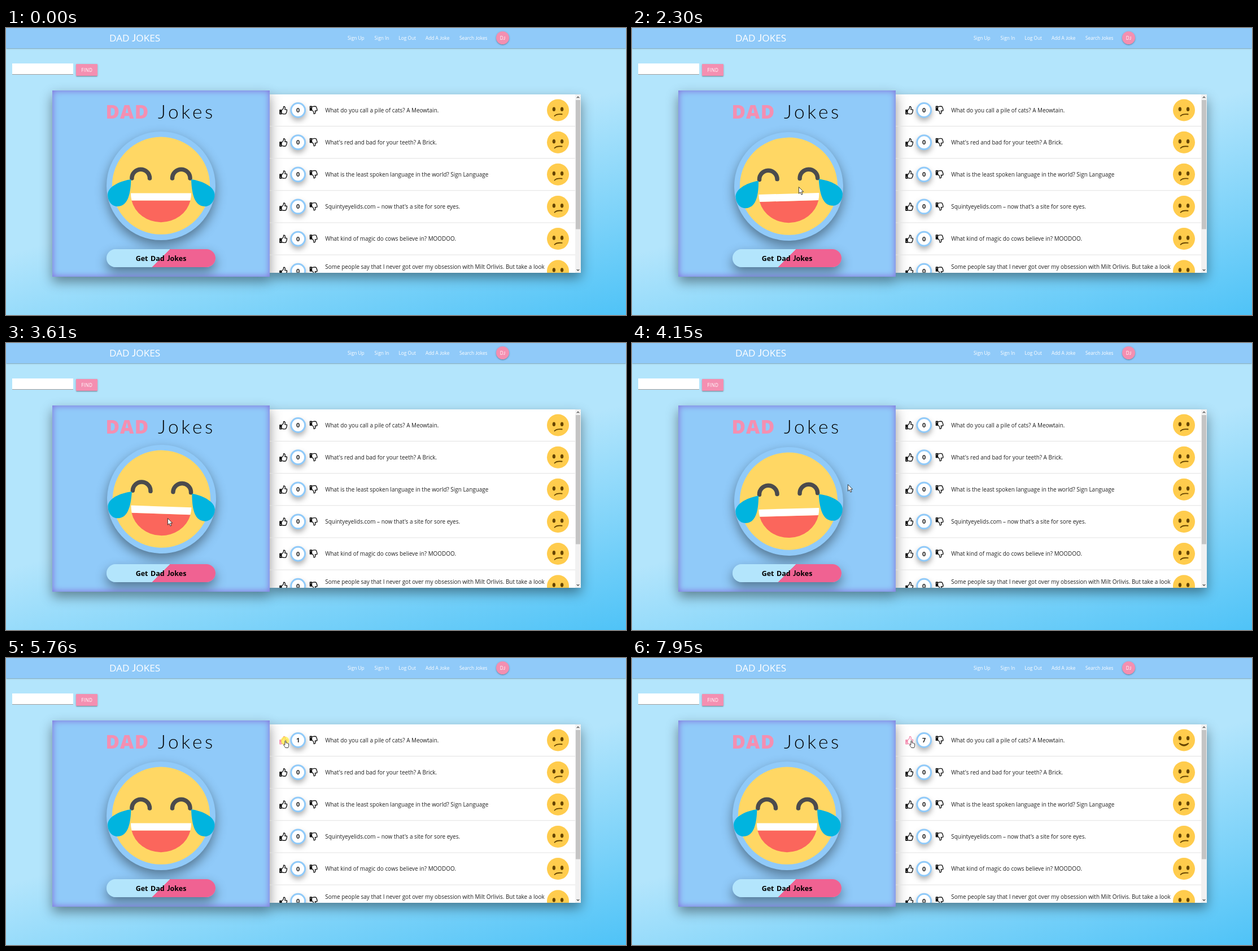
These frames come from a looping animation (1098 by 510 pixels, 8000 ms). An HTML page:

```html
<!DOCTYPE html>
<html lang="en">
<head>
<meta charset="utf-8">
<title>Dad Jokes</title>
<style>
  html, body { margin: 0; width: 100%; height: 100%; overflow: hidden; }
  body {
    position: relative;
    background: linear-gradient(165deg, #b3e5fc 50%, #4fc3f7);
    --lift: 0 9px 20px rgba(0, 0, 0, .42);
    --raise: 0 1.4px 1.4px rgba(0, 0, 0, .14), 0 2px .7px -1.4px rgba(0, 0, 0, .12), 0 .7px 3.5px rgba(0, 0, 0, .2);
  }
  div, svg { position: absolute; }
  .bar { left: 0; top: 0; width: 1098px; height: 36px; background: #90caf9; box-shadow: var(--raise); }
  .avatar { left: 868px; top: 6px; width: 23px; height: 23px; border-radius: 50%;
    background: #f48fb1; box-shadow: var(--raise); }
  .field { left: 11px; top: 63px; width: 108px; height: 19px; background: #fff;
    border-bottom: 1px solid #9e9e9e; }
  .find { left: 124px; top: 64px; width: 38px; height: 20.5px; border-radius: 1px;
    background: #f48fb1; box-shadow: var(--raise); }
  .card { left: 82px; top: 111px; width: 385px; height: 331px; }
  .list { left: 467px; top: 118px; width: 551px; height: 317px; background: #fff; }
  .lift { box-shadow: var(--lift); }
  .side { overflow: hidden; background: #90caf9; box-shadow: inset 0 0 11px 1px #8474dc; }
  .face { left: 96px; top: 72.5px; width: 193px; height: 193px; border-radius: 50%;
    background: #90caf9; box-shadow: var(--lift); }
  .get { left: 96px; top: 282px; width: 193px; height: 32px; border-radius: 16px;
    background: linear-gradient(135deg, #b3e5fc 50%, #f06292 50%); box-shadow: var(--lift); }
  .stage { left: 0; top: 0; }
  text { font-family: "Open Sans", "Noto Sans", sans-serif; white-space: pre; }
  .j { font-family: Lato, sans-serif; }
  .brand { font-size: 17.2px; fill: #fff; }
  .nav { font-size: 8.3px; fill: #fff; }
  .label { font-size: 8.1px; letter-spacing: .35px; fill: #fff; }
  .dad { font-size: 33.5px; font-weight: 800; letter-spacing: 1.5px; fill: #f48fb1; }
  .jokes { font-family: Lato, sans-serif; font-size: 33.5px; font-weight: 300; letter-spacing: 4.7px; }
  .cta { font-size: 12.5px; font-weight: 700; word-spacing: 1.2px; }
  .joke { font-size: 9.95px; fill: #212121; }
  .votes { font-size: 11px; font-weight: 700; fill: #212121; text-anchor: middle; }
  .ring { fill: #fff; stroke: #90caf9; stroke-width: 3; filter: drop-shadow(0 5px 5px rgba(0, 0, 0, .3)); }
  .thumb { fill: none; stroke: currentColor; stroke-width: 1.35; stroke-linejoin: round; color: #111; }
  .mouth { fill: none; stroke: #664500; stroke-width: 1.9; stroke-linecap: round; stroke-linejoin: round; }
</style>
</head>
<body>
<div class="bar"></div>
<div class="avatar"></div>
<div class="field"></div>
<div class="find"></div>
<div class="list lift"></div>
<div class="card lift"></div>
<div class="card side">
  <div class="face" id="face">
    <svg width="193" height="193" viewBox="178 183.5 193 193" overflow="visible">
      <circle cx="274.5" cy="279.7" r="86.6" fill="#ffd764"/>
      <g fill="none" stroke="#4b4b4d" stroke-width="7.5" stroke-linecap="round">
        <path d="M222.9 266.5a15.8 15.8 0 0 1 31.6 0"/>
        <path d="M294.5 266.5a15.8 15.8 0 0 1 31.6 0"/>
      </g>
      <path id="tear" fill="#00b4df" d="M221.5 268.5C205 270.5 181 280 180 295C180 307 187 316.5 197 316.5C214 316.5 220.5 299 221.5 268.5Z"/>
      <use href="#tear" transform="matrix(-1 0 0 1 549.5 0)"/>
      <path fill="#fb665c" d="M222.4 306H326.6A53.5 50 0 0 1 222.4 306Z"/>
      <path fill="#fff" d="M221 293H328Q328 300 326.4 306H222.6Q221 300 221 293Z"/>
    </svg>
  </div>
  <div class="get"></div>
</div>

<svg class="stage" width="1098" height="510" viewBox="0 0 1098 510">
  <defs>
    <clipPath id="view"><rect x="467" y="118" width="541" height="317"/></clipPath>
    <g id="hand-icon">
      <path d="M4.4 7.4C6.4 6.3 7.6 4.2 7.7 1C9.6.6 10.9 2.2 10.2 4.8L9.8 6.2H12.6C13.6 6.3 13.9 7.4 13.2 8.1C13.7 8.9 13.5 9.7 12.8 10.3C13.1 11.2 12.7 12 12 12.4C12.1 13.5 11.4 14.2 10.2 14.2H8C6.4 14.2 5.6 13.4 4.4 13.3"/>
      <path fill="currentColor" d="M.9 7H4V14.2H.9Z"/>
      <circle cx="2.4" cy="12.4" r=".7" fill="#fff" stroke="none"/>
    </g>
  </defs>

  <text class="brand" x="183" y="24">DAD <tspan class="j">J</tspan>OKES</text>
  <g class="nav">
    <text x="605" y="20.8">Sign Up</text>
    <text x="652.5" y="20.8">Sign In</text>
    <text x="695.5" y="20.8">Log Out</text>
    <text x="743" y="20.8">Add A <tspan class="j">J</tspan>oke</text>
    <text x="803" y="20.8">Search <tspan class="j">J</tspan>okes</text>
    <text x="879.5" y="20.8" text-anchor="middle">D<tspan class="j">J</tspan></text>
  </g>
  <text class="label" x="133.3" y="78">FIND</text>
  <text class="dad" x="176.5" y="161">DAD</text>
  <text class="jokes" x="269" y="161">Jokes</text>
  <text class="cta" x="229.7" y="414">Get Dad <tspan class="j">J</tspan>okes</text>

  <g id="rows" clip-path="url(#view)"></g>

  <rect x="1008" y="118" width="10" height="317" fill="#f1f1f1"/>
  <rect x="1009" y="128" width="8" height="229.5" fill="#c4c4c4"/>
  <path d="M1010.8 124.4l2.2-2.2 2.2 2.2M1010.8 429l2.2 2.2 2.2-2.2" fill="none" stroke="#505050" stroke-width="1.3"/>

  <circle id="flash" cx="494" cy="147" r="7.4" fill="#ffee30" fill-opacity=".68"/>
  <g id="cursor" stroke="#111" stroke-width=".8" stroke-linejoin="round" fill="#fff">
    <path id="arrow" d="M.4.5V12.2L3.1 9.7L5 14.2L7 13.3L5.1 9H8.7Z"/>
    <path id="pointer" d="M2.9 7.2V1.6Q3.9 0 4.9 1.6V5Q6 4.4 6.6 5.3Q7.6 4.8 8.2 5.8Q9.5 5.5 9.6 7V9.6Q9.5 11.6 8.5 13.5H3.9Q2.7 11.6.6 8.5Q.7 6.8 2.9 8.4Z"/>
  </g>
</svg>

<script>
const LOOP = 8000, PITCH = 57.15, SHAKE = 415;
const $ = id => document.getElementById(id);

const jokes = [
  "What do you call a pile of cats? A Meowtain.",
  "What's red and bad for your teeth? A Brick.",
  "What is the least spoken language in the world? Sign Language",
  "Squintyeyelids.com – now that's a site for sore eyes.",
  "What kind of magic do cows believe in? MOODOO.",
  "Some people say that I never got over my obsession with Milt Orlivis. But take a look"
];
const moods = {
  confused: { eyes: 144.3, fill: "none", mouth: "M971.6 156.2Q975 152.3 984.6 153.3" },
  neutral: { eyes: 142.5, fill: "none", mouth: "M970 154H985.5" },
  smile: { eyes: 142.5, fill: "#664500",
    mouth: "M969.8 151.8Q977.5 160 985.2 151.8Q977.5 157 969.8 151.8Z" }
};

$("rows").innerHTML = jokes.map((joke, i) => `
  <g transform="translate(0 ${i * PITCH})">
    <path d="M467 174.5H1008" stroke="#e2e2e2"/>
    <use class="thumb" href="#hand-icon" transform="translate(484 138.6)"/>
    <circle class="ring" cx="517.2" cy="146" r="12.4"/>
    <text class="votes" x="517.2" y="150">0</text>
    <use class="thumb" href="#hand-icon" transform="matrix(1 0 0 -1 537.5 153.4)"/>
    <text class="joke" x="565.3" y="${i < 5 ? 149.8 : 142.2}">${joke}</text>
    <circle cx="977.5" cy="146" r="19.5" fill="#ffcc4d"/>
    <g class="eyes" transform="translate(977.5 ${moods.confused.eyes})" fill="#664500">
      <ellipse cx="-7.1" rx="2.7" ry="3.8"/>
      <ellipse cx="7.1" rx="2.7" ry="3.8"/>
    </g>
    <path class="mouth" d="${moods.confused.mouth}"/>
  </g>`).join("");

const first = sel => $("rows").querySelector(sel);
const thumb = first(".thumb"), votes = first(".votes");
const eyes = first(".eyes"), mouth = first(".mouth");

// time, x, y of the pointer tip
const path = [
  [290, 991, 450], [1070, 456, 134], [1150, 440, 118], [1610, 308, 210], [1920, 300, 250],
  [2300, 295, 282], [2760, 291, 340], [3200, 286, 431], [3610, 286, 311], [3900, 320, 287],
  [4150, 382, 251], [4450, 513, 230], [4530, 538, 217], [5000, 506, 168], [5380, 491, 146]
];
// x, y, degrees at each tenth of the shake
const poses = [
  [2, 2, 0], [-2, -4, -2], [-5, 0, 2], [4, 3, 0], [1, -3, 2], [-2, 3, -2],
  [-5, 2, 0], [3, 1, -1.6], [-2, -2, 2], [2, 4, 0], [2, -4, -2]
].map((p, i) => [i / 10, ...p]);
// phase origin, from, to
const hovers = [[1594.5, 1615, 2830], [3444, 3560, 4180]];
const clicks = [5680, 5910, 6150, 6470, 6870, 7250, 7570];
const flashes = [[5610, 5830], [5910, 6080], [6150, 6230], [6400, 6470],
  [6700, 6870], [7100, 7250], [7420, 7570], [7880, 7950]];

function at(track, t) {
  let i = track.findIndex(p => p[0] > t);
  if (i < 0) return track[track.length - 1].slice(1);
  i = Math.max(i, 1);
  const a = track[i - 1], b = track[i];
  const k = Math.max(0, (t - a[0]) / (b[0] - a[0]));
  return a.slice(1).map((v, n) => v + (b[n + 1] - v) * k);
}
const within = (t, from, to) => t >= from && t < to;
const show = (el, on) => el.style.display = on ? "" : "none";

function draw(t) {
  const hover = hovers.find(h => within(t, h[1], h[2]));
  const [dx, dy, turn] = hover ? at(poses, (t - hover[0]) / SHAKE % 1) : [0, 0, 0];
  $("face").style.transform = `translate(${dx}px, ${dy}px) rotate(${turn}deg)`;

  const [x, y] = at(path, t);
  const onThumb = t >= 5250;
  $("cursor").setAttribute("transform", `translate(${x} ${y})`);
  show($("cursor"), t >= 290);
  show($("arrow"), !onThumb);
  show($("pointer"), onThumb);
  thumb.style.color = onThumb ? "#f48fb1" : "";
  show($("flash"), flashes.some(f => within(t, ...f)));

  const count = clicks.filter(c => t >= c).length;
  const mood = moods[count >= 6 ? "smile" : count >= 3 ? "neutral" : "confused"];
  votes.textContent = count;
  eyes.setAttribute("transform", `translate(977.5 ${mood.eyes})`);
  mouth.setAttribute("d", mood.mouth);
  mouth.style.fill = mood.fill;
}

let start;
function tick(now) {
  start ??= now;
  draw((now - start) % LOOP);
  requestAnimationFrame(tick);
}
draw(0);
requestAnimationFrame(tick);
</script>
</body>
</html>
```
